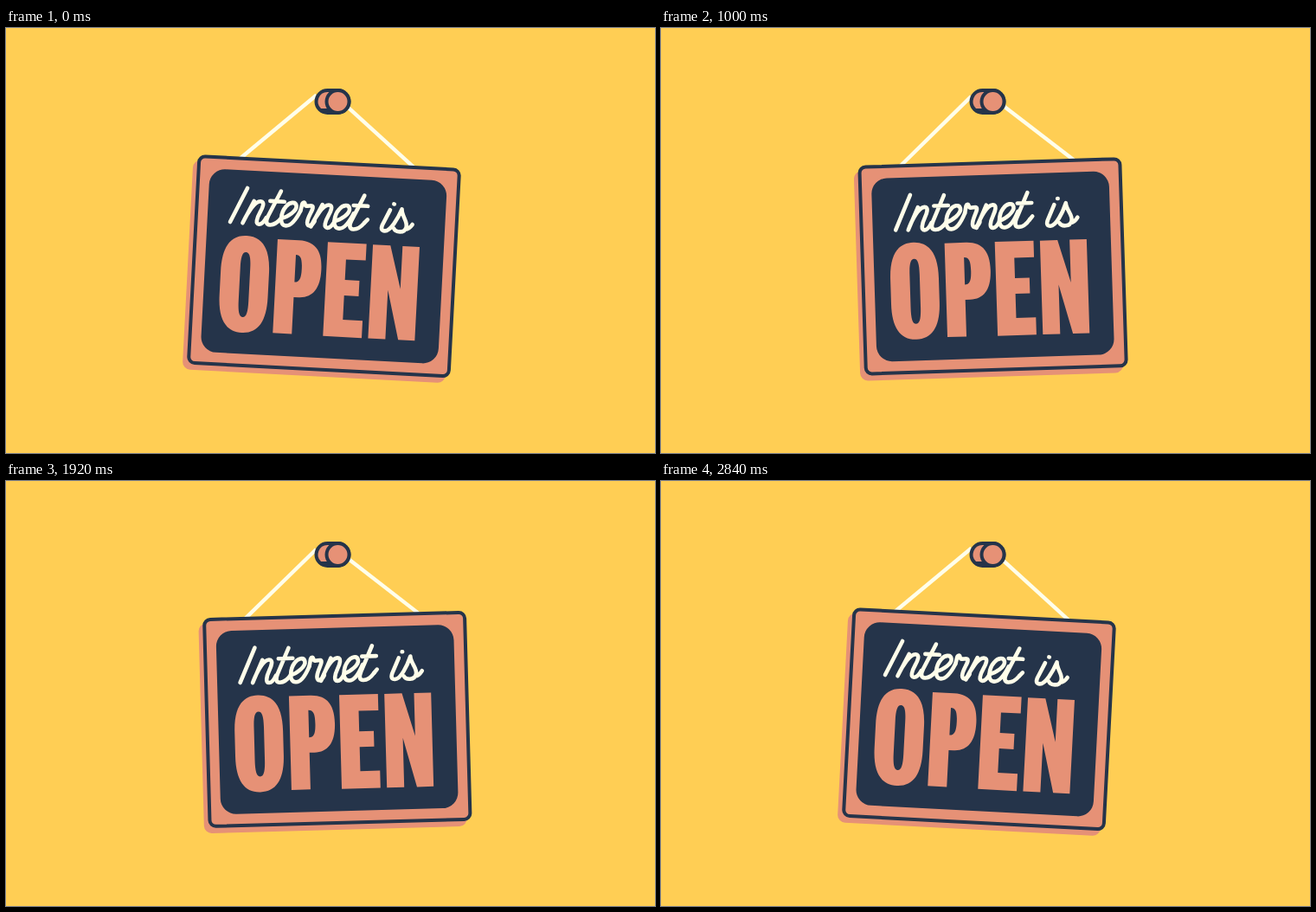
These frames come from a looping animation (750x491 px, 2880 ms). An HTML page:

```html
<!DOCTYPE html>
<html lang="en">
<head>
<meta charset="utf-8">
<title>Internet is open</title>
<style>
  html, body { margin: 0; width: 100%; height: 100%; overflow: hidden; background: #ffce54; }
  svg { display: block; width: 100%; height: 100%; }
  .navy { fill: #25344a; }
  .pink { fill: #e69176; }
  .outline { stroke: #25344a; stroke-width: 4; }
  .cream { fill: none; stroke: #fffeea; stroke-width: 4.4; }
  .script { stroke-width: 4.6; stroke-linecap: round; stroke-linejoin: round; }
</style>
</head>
<body>
<svg viewBox="0 0 750 491" role="img" aria-label="Internet is OPEN">
  <defs>
    <path id="n" d="M293 204.500L281 230.500C286 218 294 204.500 300.500 204.500C306 204.500 303 212 300.500 217C297 224 295.500 231 300 231C303 231 306 227 308 223"/>
    <path id="e" d="M325 223C333 221 343 213 342 207.500C341 202 334 203.500 330 209C325 215 322 231 331 231C337 231 343 222 347 213"/>
    <path id="t" d="M323.500 191.500L310 221C307 228 308.500 231 312.500 231C317 231 322 227 325 223M311.500 203.500H328"/>
  </defs>

  <g id="sign">
    <path class="cream" d="M271 159.200L358.500 78.500M478 158.200L393 88.500"/>
    <rect class="pink" x="220.200" y="160.500" width="304" height="242.500" rx="9"/>
    <rect class="pink outline" x="227" y="156" width="301" height="239" rx="7"/>
    <rect class="navy" x="240" y="169.700" width="274.700" height="211.800" rx="18"/>

    <g class="cream script">
      <path d="M284.500 190L266.500 230"/>
      <use href="#n"/>
      <use href="#t"/>
      <use href="#e"/>
      <path d="M347 213C348.500 208 348 203 350.500 203C352.500 203 351 207 354 207C358 207 361.500 205 361 209C360.500 213 355.500 220 355.500 226C355.500 232 361 230 364 224"/>
      <use href="#n" x="79"/>
      <use href="#e" x="61.500"/>
      <use href="#t" x="96.500"/>
      <path d="M421.500 223L425 219"/>
      <path d="M450.500 206.500L442.500 224C440.500 229 442 231 445.500 231C452 231 460 216 464 205C464 213 472 219 470 226C468 233 458 232 456 228M469 228C473 228 475 225 477 222M454.500 199.500h.5"/>
    </g>

    <g class="pink" fill-rule="evenodd">
      <path d="M286.500 245C305 245 314.500 259 314.500 287V315C314.500 343 305 357 286.500 357C268 357 258.600 343 258.600 315V287C258.600 259 268 245 286.500 245ZM286.700 264C282.500 264 281 270 281 282V320C281 333 282.500 339 286.700 339C291 339 292.500 333 292.500 320V282C292.500 270 291 264 286.700 264Z"/>
      <path d="M322.400 247H347C367 247 374.600 259 374.600 280C374.600 302 366 313 350 313H344.400V355.500H322.400ZM344.400 264V295.500C350 295.500 352 291 352 280C352 268 350 264 344.400 264Z"/>
      <path d="M380.500 247.300H425.300V266.300H402.500V290H419.300V308H402.500V336H425.300V356H380.500Z"/>
      <path d="M432.700 247.500H453L467 297V247.500H486.700V356H467.500L452.700 299V356H432.700Z"/>
    </g>
  </g>

  <g id="knob">
    <rect class="navy" x="356.500" y="70" width="42" height="30" rx="15"/>
    <path class="pink" d="M377 74H371.500A11 11 0 0 0 364 93H374Z"/>
    <circle class="pink outline" cx="383.500" cy="85" r="13"/>
  </g>
</svg>
<script>
  const LOOP = 2880, TURN = 1440, SWING = 1400;
  const MAX_ANGLE = 3;
  const sign = document.getElementById('sign');

  const easeInOut = u => u < .5 ? 2 * u * u : 1 - 2 * (1 - u) ** 2;

  // The swing back mirrors the swing out, with a short rest around the loop point.
  function angleAt(time) {
    const fromTurn = Math.min(Math.abs(time - TURN) / SWING, 1);
    return MAX_ANGLE * (2 * easeInOut(fromTurn) - 1);
  }

  function draw() {
    const angle = angleAt(performance.now() % LOOP);
    sign.setAttribute('transform', `rotate(${angle} 377 84)`);
    requestAnimationFrame(draw);
  }
  draw();
</script>
</body>
</html>
```
